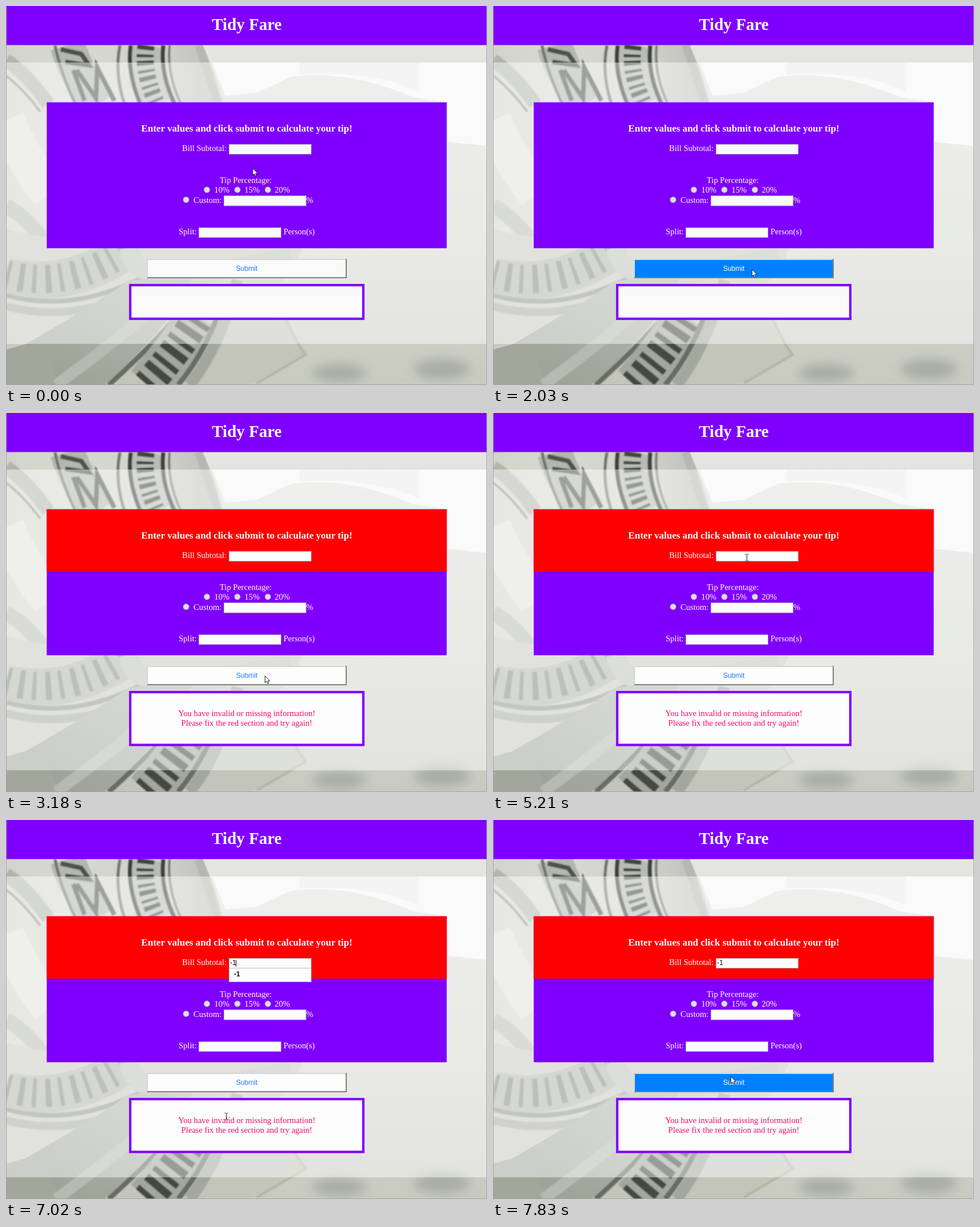
Animation of 844x664 px, one loop 7990 ms. Source, as an HTML page:

```html
<!DOCTYPE html>
<html lang="en">
<head>
<meta charset="utf-8">
<title>Tip calculator</title>
<style>
  html, body { margin: 0; width: 100%; height: 100%; overflow: hidden; }
  svg { display: block; width: 844px; height: 664px; --paper: #fafafa; }
  text { font: 14.56px "Liberation Serif", "Times New Roman", serif; fill: #fff; }
  .mid { text-anchor: middle; }
  .title { font-size: 29.1px; font-weight: bold; }
  .lead { font-size: 17.04px; font-weight: bold; }
  .sans { font: 12.13px "Liberation Sans", Arial, sans-serif; fill: #111; }
  .bold { font-weight: bold; }
  .paper { fill: var(--paper); }
  .field { fill: var(--paper); stroke: #b4aebe; }
  .radio { fill: #dedede; stroke: #8c8c8c; stroke-width: .8; }
  #message text { fill: #f0086a; }
</style>
</head>
<body>
<svg viewBox="0 0 844 664">
  <defs>
    <linearGradient id="sky" x2="0" y2="1">
      <stop offset=".1" stop-color="#e5e6e2"/><stop offset=".3" stop-color="#dcddd8"/>
      <stop offset=".65" stop-color="#d6d8d0"/><stop offset="1" stop-color="#c8cac0"/>
    </linearGradient>
    <linearGradient id="roll">
      <stop offset="0" stop-color="#d2d4cc"/><stop offset=".3" stop-color="#d8d9d1"/>
      <stop offset=".72" stop-color="#cfd0c9"/><stop offset=".93" stop-color="#c0c1ba"/>
      <stop offset="1" stop-color="#d8d9d4"/>
    </linearGradient>
    <linearGradient id="fold" x1=".1" y1="1" x2=".9" y2="0">
      <stop offset="0" stop-color="#9a9f94"/><stop offset=".5" stop-color="#a9ada3"/>
      <stop offset="1" stop-color="#b4b8b0"/>
    </linearGradient>
    <filter id="soft" x="-20%" y="-20%" width="140%" height="140%"><feGaussianBlur stdDeviation="1"/></filter>
    <filter id="haze" x="-50%" y="-50%" width="200%" height="200%"><feGaussianBlur stdDeviation="9"/></filter>
  </defs>

  <!-- soft banknote backdrop -->
  <rect width="844" height="664" fill="url(#sky)"/>
  <path d="M362 99H844V245L775 238V169L715 160Q600 110 500 124L440 152L385 157Z" fill="#f6f6f6"/>
  <path d="M515 99H725V150Q640 112 515 120Z" fill="#eaeaea"/>
  <path d="M0 69H345Q365 110 385 180L300 424L0 440Z" fill="url(#roll)"/>
  <g fill="none" filter="url(#soft)">
    <path d="M0 95Q38 120 74 172" stroke="#b2b5ab" stroke-width="24"/>
    <path d="M0 122Q30 145 60 185" stroke="#8d9187" stroke-width="4"/>
    <path d="M0 200Q25 260 76 330" stroke="#e2e3dc" stroke-width="64"/>
    <path d="M0 350Q40 372 76 425" stroke="#b9bcb5" stroke-width="26"/>
    <path d="M108 69Q122 118 165 172" stroke="#b4b7af" stroke-width="62"/>
    <path d="M86 69Q96 118 122 172M200 69Q190 118 208 172" stroke="#6f746b" stroke-width="5"/>
    <path d="M96 76L132 84L146 104L104 98M118 112L138 166M124 112L158 162L160 108L190 166" stroke="#4e534a" stroke-width="8"/>
    <path d="M246 69Q238 115 266 172" stroke="#b9bcb4" stroke-width="60"/>
    <path d="M219 69Q212 115 236 172M276 69Q270 118 296 172" stroke="#3d413a" stroke-width="7"/>
    <path d="M246 69Q238 115 265 172" stroke="#41463e" stroke-width="30" stroke-dasharray="8 8 5 6"/>
    <path d="M287 69Q282 118 307 172" stroke="#777b72" stroke-width="4"/>
    <path d="M338 69Q354 115 372 172" stroke="#b5b8b0" stroke-width="14"/>
  </g>
  <path d="M0 390Q100 420 300 410L520 424L500 470L390 560L250 664H0Z" fill="#c8cac3"/>
  <g fill="none" filter="url(#soft)">
    <path d="M0 474Q110 500 220 424" stroke="#b2b6ae" stroke-width="66"/>
    <path d="M0 470Q110 500 218 424" stroke="#858b83" stroke-width="50" stroke-dasharray="7 16 10 14"/>
    <path d="M0 507Q120 540 250 470" stroke="#8f948c" stroke-width="8"/>
    <path d="M0 526Q110 556 235 500" stroke="#a6aaa3" stroke-width="14"/>
    <path d="M215 424Q225 480 320 475L500 440" stroke="#bfc2bb" stroke-width="34"/>
  </g>
  <path d="M0 664V612Q120 545 215 482L330 465Q310 545 190 664Z" fill="url(#fold)"/>
  <path d="M0 664V602L62 585L95 664Z" fill="#a2a69b"/>
  <path d="M172 664Q245 600 290 540L390 530L490 548Q508 590 526 612L430 664Z" fill="#c3c5bb"/>
  <g fill="none" filter="url(#soft)">
    <path d="M88 664Q190 590 270 520" stroke="#b6bab0" stroke-width="20"/>
    <path d="M180 664Q262 590 308 535" stroke="#686d63" stroke-width="9"/>
    <path d="M248 664Q300 605 338 545" stroke="#a3a79d" stroke-width="76"/>
    <path d="M248 664Q300 605 338 545" stroke="#444941" stroke-width="54" stroke-dasharray="10 12 14 9"/>
    <path d="M302 664Q356 600 386 500" stroke="#686d63" stroke-width="9"/>
    <path d="M322 664Q374 600 406 480" stroke="#a3a79d" stroke-width="20"/>
    <path d="M490 545Q508 588 526 611L440 661" stroke="#b5b2a2" stroke-width="4"/>
  </g>
  <g fill="#a9aea5" filter="url(#haze)">
    <ellipse cx="585" cy="643" rx="48" ry="16"/><ellipse cx="765" cy="636" rx="50" ry="18"/>
  </g>

  <rect id="veil" x="1" y="99" width="842" height="493" fill="#fff" opacity=".45"/>
  <rect width="844" height="68.5" fill="#8000ff"/>
  <path d="M.5 0V663.5H843.5V0" fill="none" stroke="#a2a2a2"/>
  <text class="mid title" x="422.5" y="42">Tidy Fare</text>

  <rect x="71.5" y="168.7" width="701.8" height="255.7" fill="#8000ff"/>
  <rect id="alert" x="71.5" y="168.7" width="701.8" height="109.3" fill="#f00"/>
  <text class="mid lead" x="422.5" y="220">Enter values and click submit to calculate your tip!</text>
  <text x="309" y="254">Bill Subtotal:</text>
  <rect class="field" x="391.5" y="242.5" width="144" height="17"/>
  <text x="375" y="310">Tip Percentage:</text>
  <circle class="radio" cx="352.5" cy="322" r="5.2"/><text x="365.5" y="327">10%</text>
  <circle class="radio" cx="406" cy="322" r="5.2"/><text x="418.5" y="327">15%</text>
  <circle class="radio" cx="459.5" cy="322" r="5.2"/><text x="471.5" y="327">20%</text>
  <circle class="radio" cx="316" cy="339.5" r="5.2"/><text x="329" y="345">Custom:</text>
  <rect class="field" x="382.5" y="332.5" width="144" height="17.5"/><text x="527" y="345">%</text>
  <text x="303" y="400">Split:</text>
  <rect class="field" x="338.5" y="388.5" width="144" height="17"/><text x="487" y="400">Person(s)</text>

  <text id="typed" class="sans" x="393" y="254"></text>
  <path id="caret" d="M.5 245V257" stroke="#000"/>
  <g id="suggestion">
    <rect x="391.5" y="259.5" width="144" height="24" fill="#fff" stroke="#b8b8b8"/>
    <text class="sans bold" x="400" y="274">-1</text>
  </g>

  <rect id="button" x="248" y="443" width="349" height="33"/>
  <path d="M248 476V444H597" fill="none" stroke="#d6d6d6" stroke-width="2"/>
  <path d="M248 476H597V443" fill="none" stroke="#808080" stroke-width="2"/>
  <rect id="ring" x="247.5" y="443.5" width="350" height="33" fill="none" stroke="#80b5ed" stroke-width="2.4"/>
  <text id="label" class="sans mid" x="422.5" y="464">Submit</text>

  <rect id="result" class="paper" x="218" y="489" width="409" height="59" stroke="#8000ff" stroke-width="4.2"/>
  <g id="message">
    <text class="mid" x="422.5" y="531">You have invalid or missing information!</text>
    <text class="mid" x="422.5" y="548">Please fix the red section and try again!</text>
  </g>
  <path id="arrow" d="M.5 .5V12.5L3.2 10L5 14L7 13.2L5.2 9.2H9Z" fill="#fff" stroke="#111" stroke-width=".9"/>
  <path id="beam" d="M-3 -5.5H-.8M.8 -5.5H3M0 -5V5.5M-3 6H-.8M.8 6H3" fill="none" stroke="#222"/>
</svg>
<script>
const LOOP = 7990;
const el = id => document.getElementById(id);
const show = (id, on) => el(id).style.display = on ? "" : "none";

// The pointer holds each pose until the next: time, shape, x, y
const pointer = [
  [0, "arrow", 432.5, 284], [1210, "arrow", 446.5, 282], [1470, "arrow", 511, 375],
  [1610, "arrow", 499, 408], [1740, "arrow", 484, 441], [1890, "arrow", 480, 443],
  [2030, "arrow", 454, 461], [2180, "arrow", 454, 460], [3580, "arrow", 448, 275],
  [3770, "beam", 446, 252], [3900, "beam", 446.5, 254], [4050, "arrow", 443, 261],
  [4330, "beam", 445.5, 252], [4480, "arrow", 443, 261], [5210, "beam", 445.5, 253],
  [5360, "beam", 445.5, 245], [6630, "arrow", 432, 315], [6750, "arrow", 400, 458],
  [6870, "beam", 381.5, 519], [7020, "beam", 386.5, 519], [7160, "beam", 389.5, 516],
  [7290, "arrow", 402, 468], [7410, "arrow", 412, 455], [7540, "arrow", 417, 449]
];

function draw(t) {
  const within = (from, to = LOOP) => t >= from && t < to;
  const invalid = within(3180);
  const hover = within(2030, 3180) || within(6750, 6870) || within(7290);
  const typed = t < 6170 ? "" : t < 6320 ? "-" : "-1";

  document.querySelector("svg").style.setProperty("--paper", invalid ? "#fdfdfd" : "#fafafa");
  el("veil").setAttribute("height", invalid ? 527 : 493);
  el("result").setAttribute("height", invalid ? 92.5 : 59);
  show("alert", invalid);
  show("message", invalid);

  el("typed").textContent = typed;
  el("caret").setAttribute("transform", `translate(${[392, 397, 403][typed.length]})`);
  show("caret", within(5490, 6030) || within(6170, 7160));
  show("suggestion", within(6170, 7700));

  el("button").style.fill = hover ? "#0080ff" : "var(--paper)";
  el("label").style.fill = hover ? "#fff" : "#1a7cff";
  show("ring", within(3050, 3180) || within(7700, 7830));

  const [, shape, x, y] = pointer.findLast(pose => pose[0] <= t);
  for (const id of ["arrow", "beam"]) show(id, id === shape);
  el(shape).setAttribute("transform", `translate(${x} ${y})`);
}

const start = performance.now();
function tick() {
  draw((performance.now() - start) % LOOP);
  requestAnimationFrame(tick);
}
tick();
</script>
</body>
</html>
```
